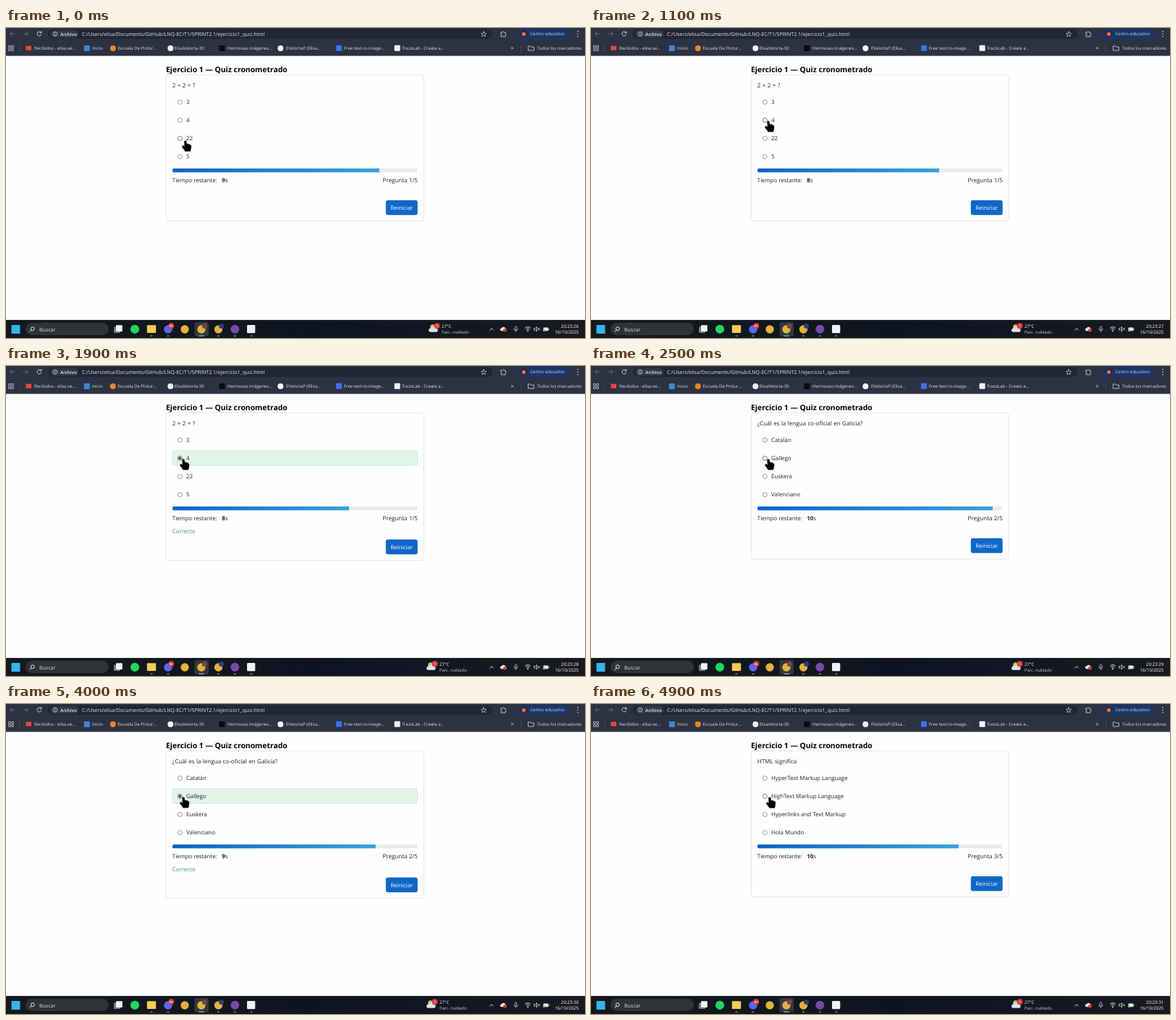
These frames come from a looping animation (800 by 428 pixels, 5 s). An HTML page:

```html
<!DOCTYPE html>
<html lang="es">
<head>
<meta charset="utf-8">
<title>Quiz cronometrado</title>
<style>
html, body { margin: 0; height: 100%; overflow: hidden; background: #fefefe; }
svg { display: block; width: 100vw; height: 100vh; }
text { font-family: "Open Sans", "Noto Sans", sans-serif; text-rendering: geometricPrecision; white-space: pre; }
</style>
</head>
<body>
<svg id="stage" viewBox="0 0 800 428"></svg>
<script>
const text = (x, y, s, size, fill, extra = '') =>
  `<text x="${x}" y="${y}" font-size="${size}" fill="${fill}" ${extra}>${s}</text>`;
const rect = (x, y, w, h, fill, r = 0, extra = '') =>
  `<rect x="${x}" y="${y}" width="${w}" height="${h}" rx="${r}" fill="${fill}" ${extra}/>`;
const dot = (x, y, r, fill, extra = '') =>
  `<circle cx="${x}" cy="${y}" r="${r}" fill="${fill}" ${extra}/>`;
const line = (d, color, w = 1, extra = '') =>
  `<path d="${d}" fill="none" stroke="${color}" stroke-width="${w}" stroke-linecap="round" stroke-linejoin="round" ${extra}/>`;
const END = 'text-anchor="end"', BOLD = 'font-weight="700"';
const rowY = i => 102.1 + 25.1 * i;

function toolbar() {
  const pale = '#d5d8e0', dim = '#6d7280';
  const marks = [
    [39, 'Recibidos - elisa.ve...'], [119, 'Inicio'], [154.5, 'Escuela De Pintur...'],
    [232.5, 'ElisaVelorta-30'], [306, 'Hermosas imágenes...'], [387, 'EVelortaP (Elisa...'],
    [467, 'Free text-to-image...'], [547, 'TrazoLab - Create a...'], [734, 'Todos los marcadores']
  ];
  return rect(0, 0, 800, 38.5, '#2c3241') + rect(58, 1.5, 614, 13.5, '#202634', 6.7) +
    line('M12 8H6M8.4 5.4L5.8 8L8.4 10.6M24 8H30M27.6 5.4L30.2 8L27.6 10.6', dim, .9) +
    line('M48.4 6.2A3 3 0 1 0 48.8 9M48.9 4.6V6.7H46.8', pale, .9) +
    rect(61.5, 2.8, 39, 11, '#303747', 5.5) +
    dot(68, 8.2, 2.9, 'none', `stroke="${pale}" stroke-width=".8"`) +
    line('M68 8V9.7M68 6.6V6.7', pale, .8) +
    text(75, 10.5, 'Archivo', 6.3, '#eceef2', 'font-weight="600"') +
    text(105, 10.7, 'C:/Users/elisa/Documents/GitHub/LNQ-EC/T1/SPRINT2.1/ejercicio1_quiz.html', 7.04, '#e4e6eb') +
    line('M660 4.8L661 7.2L663.6 7.4L661.6 9.1L662.3 11.7L660 10.3L657.7 11.7L658.4 9.1L656.4 7.4L659 7.2Z', pale, .7) +
    line('M684 6H686A1 1 0 0 1 688 6H690V8A1 1 0 0 1 690 10V12H684V10A1 1 0 0 0 684 8Z', pale, .8) +
    rect(706, .6, 72.4, 15.5, '#1d3566', 7.7) + dot(715.5, 8.2, 5, '#30253e') +
    dot(715.5, 8.4, 2.6, '#d9733c') + text(724.3, 10.4, 'Centro educativo', 6, '#c9daf8') +
    [4.6, 8.2, 11.8].map(y => dot(790, y, .8, pale)).join('') +
    [[3.5, 24.5], [7.7, 24.5], [3.5, 28.7], [7.7, 28.7]]
      .map(([x, y]) => rect(x, y, 2.7, 2.7, 'none', .2, `stroke="${pale}" stroke-width=".7"`)).join('') +
    rect(18.6, 23, .6, 10, '#535865') + rect(711.5, 23, .6, 10, '#535865') +
    rect(27.5, 24.7, 7.5, 6, '#e5493a') + rect(107.8, 24, 8, 8, '#4285d8', 1) +
    dot(147.8, 28, 4, '#f08426') + dot(227.3, 28, 4, '#f3f4f6') +
    rect(294.4, 24, 8, 8, '#0b0b0d') + dot(379.3, 28, 4, '#f3f4f6') +
    rect(456, 23.8, 8, 8, '#3e70ee', 1) + rect(536.6, 23.8, 8, 8, '#f3f4f6', 1) +
    marks.map(([x, s]) => text(x, 30.2, s, 6, '#dfe1e7')).join('') +
    text(697.5, 30.4, '»', 8, pale) +
    line('M721.8 25H724.6L725.6 26.2H729.4V31H721.8Z', pale, .8);
}

function quiz() {
  const ink = '#222326';
  let s = text(221, 60.8, 'Ejercicio 1 — Quiz cronometrado', 10.4, '#000', BOLD) +
    rect(221.2, 65.3, 356, 202, '#f1f2f4', 3.5) +
    rect(221.2, 64.7, 356, 201.8, '#fefefe', 3.5, 'id="card" stroke="#dde1e9" stroke-width=".8"') +
    text(229.8, 82, '', 8.05, ink, 'id="ask" word-spacing=".3"') +
    rect(230, 116.5, 338.6, 20.8, '#e2f4ea', 3, 'id="row" stroke="#c6e7d5" stroke-width=".7"');
  for (let i = 0; i < 4; i++)
    s += dot(240.3, rowY(i) + .2, 3, '#fff', `id="radio${i}" stroke-width=".75"`) +
      text(249, rowY(i) + 2.9, '', 7.9, ink, `id="opt${i}"`);
  return s + dot(240.3, rowY(1) + .2, 1.8, '#403b59', 'id="pick"') +
    `<g clip-path="url(#pill)">${rect(229.8, 193.7, 338.7, 5.8, '#e9ebed')}${rect(230, 193.7, 0, 5.8, 'url(#blue)', 0, 'id="bar"')}</g>` +
    text(229.8, 212.9, 'Tiempo restante:', 7.85, ink) +
    `<text x="298.2" y="212.9" font-size="7.9" fill="${ink}"><tspan id="secs" font-weight="700"></tspan>s</text>` +
    text(568.8, 212.9, '', 8.05, ink, `id="count" ${END}`) +
    text(229.8, 230.9, 'Correcto', 7.9, '#35a06b', 'id="ok"') +
    `<g id="button">${rect(524.8, 237.7, 43.9, 20.5, '#1067c8', 3)}${text(546.7, 250.9, 'Reiniciar', 7.8, '#fff', 'text-anchor="middle"')}</g>`;
}

function taskbar() {
  const pale = '#e6e8eb', browser = '#e4b13d';
  return rect(0, 403, 800, 25, 'url(#night)') + rect(0, 403, 800, .7, '#2f3238') +
    rect(7.5, 410, 12, 12, '#35b3ee', .6) +
    rect(27, 407, 115, 17, '#303336', 8.5) +
    dot(36.8, 415.2, 2.4, 'none', `stroke="${pale}"`) + line('M35 417.2L33 419.4', pale) +
    text(46, 418.6, 'Buscar', 7, '#dcdde0') +
    rect(149, 412.5, 9, 8.5, '#777b80', .8) + rect(152, 410.3, 8.8, 8.7, '#f1f2f3', .8) +
    dot(178, 415.8, 6.1, '#1ed760') + rect(194.8, 410.3, 12.4, 10.6, '#f5cb53', 1) +
    dot(224, 416, 5.8, '#5865f2') + dot(228.3, 411.2, 3.9, '#e23d43') +
    text(228.3, 412.8, '9+', 4.2, '#fff', `text-anchor="middle" ${BOLD}`) +
    rect(260.5, 406, 19.5, 19.5, '#33373d', 2) +
    [247, 270, 293.5].map(x => dot(x, 416, 5.7, browser)).join('') +
    dot(274.3, 411.6, 3.5, '#6d4b45') + dot(297.6, 411.6, 3.5, '#2d3d77') +
    dot(316.3, 415.8, 6, '#7b48a8') + rect(333, 410, 11.3, 11.3, '#eef1f4', 1.4) +
    [201, 224, 293.5, 316.3, 339].map(x => rect(x - 1.7, 424.6, 3.4, 1.2, '#94989d', .6)).join('') +
    rect(266, 424.5, 8, 1.3, '#6cc3f2', .6) +
    `<g id="weather">${dot(589.6, 412.8, 3.5, '#f0b650')}<path d="M586.3 419.7A2.6 2.6 0 0 1 587 414.5A4 4 0 0 1 594.3 414.5A2.7 2.7 0 0 1 595 419.7Z" fill="#d7e3ef"/>` +
    dot(595.5, 411.2, 4, '#dc3b3f') + text(595.5, 413, '', 5, '#fff', 'id="news" text-anchor="middle"') +
    text(602, 414, '27°C', 6.1, '#fff') + text(602, 422.1, 'Parc. nublado', 5.9, '#c6c8cb') + '</g>' +
    line('M668.6 417L671 414.7L673.4 417', pale, .9) +
    `<path d="M684.5 418.3A2 2 0 0 1 685 414.2A2.8 2.8 0 0 1 690 414.5A2 2 0 0 1 690 418.3Z" fill="${pale}"/>` +
    dot(689.3, 417.3, 2.3, '#df3b3b') +
    rect(703.2, 411.8, 2.4, 4.7, 'none', 1.2, 'stroke="#b8bbc0" stroke-width=".8"') +
    line('M701.8 415.3A2.6 2.6 0 0 0 707 415.3M704.4 418V419.5', '#b8bbc0', .8) +
    line('M717.5 414A5 5 0 0 1 724.5 414M718.9 416A3 3 0 0 1 723.1 416', pale, 1) + dot(721, 418.2, 1, pale) +
    line('M730 414.5H731.5L733.5 412.7V418.8L731.5 417H730ZM735.2 414.5L737.4 416.9M737.4 414.5L735.2 416.9', pale, .8) +
    rect(742.4, 413.4, 7, 4.8, pale, 1) + rect(749.8, 414.8, .8, 2, pale) + dot(743.4, 417.4, 1.5, '#7fcf72') +
    text(791.4, 413.8, '', 6.2, '#fff', `id="clock" ${END}`) +
    text(791.4, 422.2, '16/10/2025', 6.2, '#fff', END);
}

const stage = document.getElementById('stage');
stage.innerHTML = `<defs>
  <linearGradient id="blue"><stop stop-color="#0f61c9"/><stop offset="1" stop-color="#38a3da"/></linearGradient>
  <linearGradient id="night"><stop stop-color="#15181c"/><stop offset=".42" stop-color="#11161f"/><stop offset=".52" stop-color="#0c1322"/><stop offset=".7" stop-color="#121622"/><stop offset="1" stop-color="#181a1f"/></linearGradient>
  <clipPath id="pill"><rect x="229.8" y="193.7" width="338.7" height="5.8" rx="2.9"/></clipPath></defs>` +
  rect(0, 0, 800, 428, '#fefefe') + toolbar() + quiz() + taskbar() +
  `<path id="hand" stroke="#000" stroke-width=".4" d="M-1.5 1.2Q0-.9 1.5 1.2L2 4.9Q4 4 4.7 5.3Q6.1 4.8 6.7 6.1Q8.2 6.2 8.1 8L7.7 12L6.7 15H-.4Q-1 13-3 11.2L-4.6 8.7Q-4.4 6.7-2.5 7.4L-1 8.4Z"/>`;

const el = {};
stage.querySelectorAll('[id]').forEach(e => el[e.id] = e);
const set = (id, name, v) => el[id].setAttribute(name, v);
const write = (id, s) => { if (el[id].textContent !== s) el[id].textContent = s; };
const show = (id, on) => set(id, 'visibility', on ? 'visible' : 'hidden');

// width: bar at start, speed: px per second, from: width the refill starts at
const rounds = [
  { at: 0, ask: '2 + 2 = ?', opts: ['3', '4', '22', '5'], from: 286, width: 286, speed: 31.8,
    secs: 9, tick: 500, pick: 1300, stop: 1320 },
  { at: 2300, ask: '¿Cuál es la lengua co-oficial en Galicia?', opts: ['Catalán', 'Gallego', 'Euskera', 'Valenciano'],
    from: 244, width: 338.2, speed: 33.8, secs: 10, tick: 3300, pick: 3900, stop: 4060 },
  { at: 4900, ask: 'HTML significa',
    opts: ['HyperText Markup Language', 'HighText Markup Language', 'Hyperlinks and Text Markup', 'Hola Mundo'],
    from: 278, width: 338.2, speed: 33.8, secs: 10, tick: 5900, pick: 9000, stop: 9000 }
];
const ease = (t, a, b) => {
  const p = Math.min(1, Math.max(0, (t - a) / (b - a)));
  return p * p * (3 - 2 * p);
};

function draw(t) {
  const n = rounds.filter(r => t >= r.at).length, r = rounds[n - 1];
  const done = t >= r.pick;
  const goal = r.width - r.speed * (Math.min(t, r.stop) - r.at) / 1000;
  const up = ease(t, 400, 900), drift = ease(t, 4500, 4900);
  const x = 247.8 - 2.8 * up + 1.8 * drift, y = 155.3 - 27 * up + .2 * drift;
  const hover = y > 140 ? 2 : 1;

  write('ask', r.ask);
  r.opts.forEach((s, i) => {
    write('opt' + i, s);
    set('radio' + i, 'stroke', done && i === 1 ? '#403b59' : i === hover ? '#4c4c4c' : '#7d7d7d');
  });
  write('secs', String(r.secs - (t >= r.tick)));
  write('count', `Pregunta ${n}/5`);
  set('bar', 'width', goal + (r.from - r.width) * Math.exp((r.at - t) / 75));
  for (const id of ['row', 'pick', 'ok']) show(id, done);
  set('card', 'height', done ? 203.8 : 201.8);
  set('button', 'transform', `translate(0 ${done ? 1.8 : 0})`);
  set('hand', 'transform', `translate(${x} ${y})`);
  write('clock', '20:23:' + (26 + Math.floor((t + 700) / 1000)));
  set('weather', 'transform', `translate(${t < 500 ? 0 : -3} 0)`);
  write('news', t < 500 ? '3' : '1');
}

const begin = performance.now();
(function loop() {
  const t = performance.now() - begin;
  draw(Math.floor((t + 2) / 100) * 100 % 5000);
  requestAnimationFrame(loop);
})();
</script>
</body>
</html>
```
